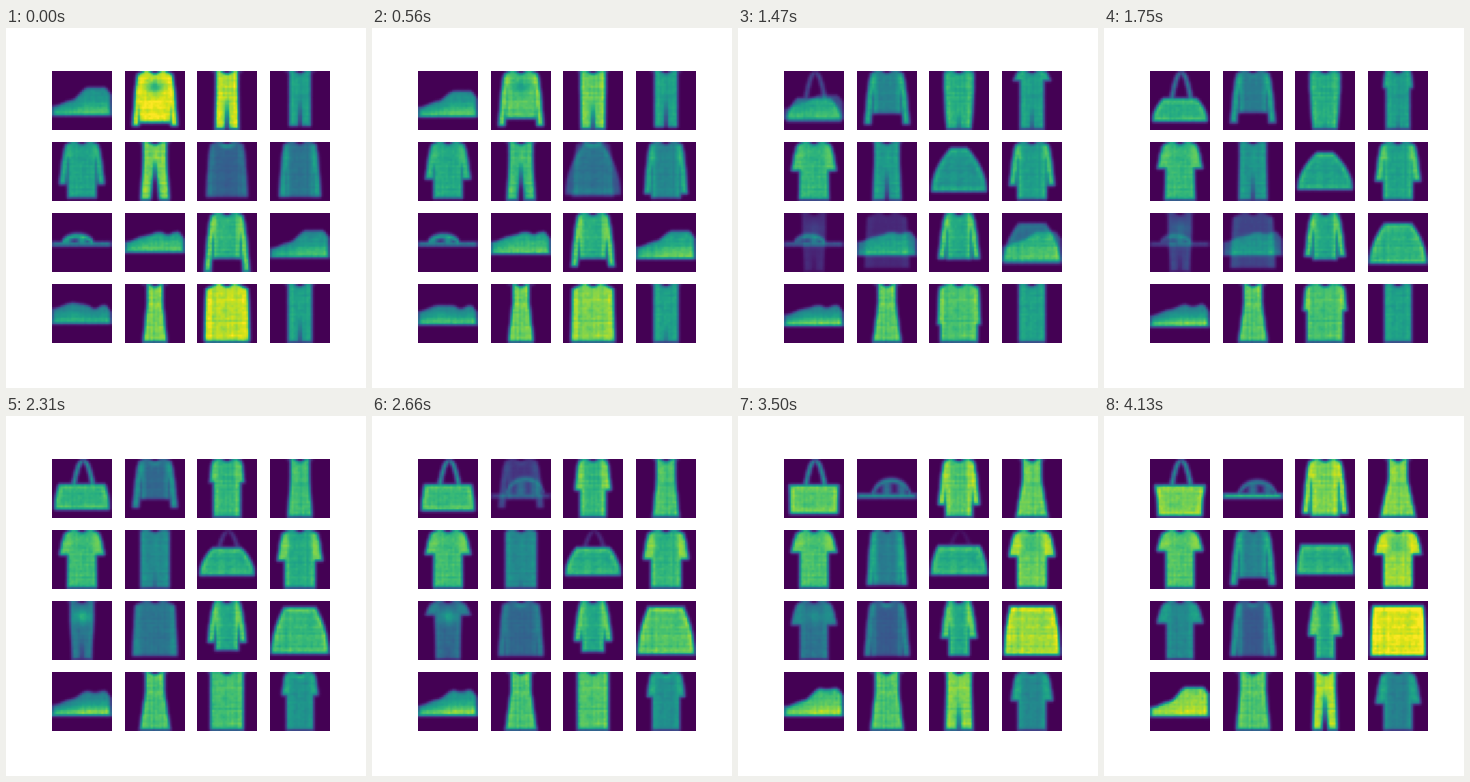
Write a matplotlib script that moves like this. It is 360 px wide and 360 px high and loops after 5.25 s.

```python
import numpy as np
import matplotlib.pyplot as plt
from matplotlib.animation import FuncAnimation

STAGE = 360
N = 28
MOVING, TOTAL, STEP = 60, 75, 70
LEFT = (46, 119, 191, 264)
TOP = (43, 114, 185, 256)
W, H = 60, 59

Y, X = np.mgrid[0:N, 0:N] + 0.5
SIDE = abs(X - 14)


def ramp(d):
    """Soft coverage from the distance inside an edge."""
    return np.clip(0.75 * d + 0.5, 0, 1)


def ease(u):
    u = np.clip(u, 0, 1)
    return u * u * (3 - 2 * u)


def glow(x, y, rx, ry):
    return np.exp(-((X - x) / rx) ** 2 - ((Y - y) / ry) ** 2)


def least(*fields):
    return np.minimum.reduce(np.broadcast_arrays(*fields))


# Painters: lengths are in picture cells, tones run from 0 to 1.
def draw_wear(tone, body, flare, hem, cuff, out, neck, crotch, gap, side, collar, chest):
    fall = Y - 0.45 * np.clip(SIDE - neck, 0, None)
    scoop = Y - 1.2 * (1 - (SIDE / 2.8) ** 2)
    half = body + flare * np.clip((Y - 9) / 18, 0, 1)
    trunk = least(half - SIDE, hem - Y)
    outer = body + (out - body) * np.sqrt(np.clip(Y / max(cuff, 0.1), 0, 1))
    width = np.interp(cuff, [12, 20], [5, 2.8])
    sleeve = least(outer - SIDE, SIDE - outer + width, cuff - Y)
    split = np.where(Y > crotch, SIDE + 1 - gap * (1 + (Y - crotch) / 8), N)
    d = least(np.maximum(trunk, sleeve), fall, scoop, split)
    light = tone - side / 3 + side * ease((SIDE - half + 3) / 3)
    light = light + collar * glow(14, 1.5, 2.6, 1.4) + chest * glow(14, 7.5, 4, 3.5)
    return ramp(d) * light


def draw_shoe(tone, sole, toe, shaft, base, dip):
    vamp = toe - 3 * ease(X / 10)
    upper = vamp - (toe - 3 - shaft) * ease((X - 9) / 8)
    upper = upper + dip * glow(20, Y, 2.5, 1) + 4 * ease((X - 24.5) / 4)
    d = least(Y - upper, base - Y, X - 0.5, 27.3 - X)
    depth = np.clip((Y - upper) / (base - upper), 0, 1)
    return ramp(d) * (tone + sole * depth ** 2)


def draw_bag(tone, top, base, wide, taper, handle):
    depth = np.clip((Y - top) / (base - top), 0, 1)
    half = wide - taper * (1 - depth) ** 2
    d = least(half - SIDE, Y - top, base - Y)
    body = ramp(d) * (tone + 0.12 * np.exp(-((d - 1) / 1.3) ** 2))
    bow = 4.4 * np.sqrt(np.clip((Y - 0.6) / (top - 0.6), 0, 1))
    strap = least(0.8 - abs(abs(X - 14.6) - bow), Y - 0.6, top - Y)
    return np.maximum(body, handle * ramp(strap))


def draw_sandal(tone, straps, sole, mid, half, lift):
    u = np.clip((X - mid) / half, -1, 1)
    crest = sole - lift * np.sqrt(1 - u * u)
    band = np.exp(-((Y - crest - 1) / 1.2) ** 2) * (abs(X - mid) < half)
    posts = ramp(least(Y - crest, sole - Y)) * (0.45 + 0.35 * np.cos(0.9 * X))
    slab = ramp(least(0.9 - abs(Y - sole), X - 0.5, 27.3 - X))
    return np.maximum(tone * slab, straps * np.maximum(band, posts))


# Looks: a painter and its settings.
PLAIN = dict(body=6.5, flare=0, hem=27.3, cuff=0, out=10.4, neck=4.5,
             crotch=9, gap=0, side=0.1, collar=0, chest=0)


def tee(tone, **kw):
    return draw_wear, {**PLAIN, "cuff": 11, "tone": tone, **kw}


def pullover(tone, **kw):
    return draw_wear, {**PLAIN, "cuff": 26, "hem": 26, "side": 0.2, "tone": tone, **kw}


def dress(tone, **kw):
    return draw_wear, {**PLAIN, "body": 4.3, "neck": 4, "tone": tone, **kw}


def trousers(tone, **kw):
    return draw_wear, {**PLAIN, "body": 5.4, "neck": 5, "gap": 0.6, "tone": tone, **kw}


def shoe(tone, **kw):
    return draw_shoe, {**dict(sole=0.3, toe=17, shaft=9, base=21, dip=0), "tone": tone, **kw}


def bag(tone, **kw):
    return draw_bag, {**dict(top=12, base=24, wide=12.8, taper=2, handle=0), "tone": tone, **kw}


def sandal(tone, **kw):
    return draw_sandal, {**dict(straps=0.48, sole=17.6, mid=16, half=9, lift=7.5),
                         "tone": tone, **kw}


def blend(a, b, t):
    """Morph one kind of look into itself; cross-fade different kinds."""
    (draw, p), (other, q) = a, b
    if draw is other:
        return draw(**{k: p[k] + (q[k] - p[k]) * t for k in p})
    return (1 - t) * draw(**p) + t * other(**q)


def soften(img):
    p = np.pad(img, 1, mode="edge")
    p = 0.14 * (p[:-2] + p[2:]) + 0.72 * p[1:-1]
    return 0.14 * (p[:, :-2] + p[:, 2:]) + 0.72 * p[:, 1:-1]


def weave(seed):
    rng = np.random.default_rng(seed)
    grain = soften(rng.normal(0, 0.04, (N, N)))
    return 1 + grain + rng.normal(0, 0.02, (N, 1)) + rng.normal(0, 0.02, (1, N))


cells = []


def cell(looks):
    """Add the next cell of the grid: looks keyed by frame."""
    cells.append((looks, weave(len(cells))))


# Row 1
cell({0: shoe(.5, shaft=8),
      16: shoe(.5, toe=18, shaft=11.5, base=22.5, sole=.4),
      25: bag(.62, top=13, taper=5, handle=.5),
      33: bag(.64, handle=.62),
      59: bag(.78, top=12.5, base=27, wide=10.3, taper=-1.5, handle=.6)})
cell({0: pullover(.97, hem=24.5, body=7.3, chest=-.35, side=0),
      16: pullover(.56, hem=20.5),
      33: pullover(.4, hem=19, cuff=23, collar=.25),
      42: sandal(.38, straps=.5, lift=9),
      59: sandal(.78)})
cell({0: trousers(.93, body=5, flare=.3),
      16: trousers(.68, body=6.8, flare=-1, crotch=13),
      25: trousers(.66, body=7, flare=-1.3, crotch=14, gap=.4),
      33: tee(.7, body=6.2, out=8),
      42: pullover(.73, body=5.8, hem=27.3, cuff=18, out=8.7),
      59: pullover(.84, hem=27, side=.1)})
cell({0: trousers(.58, body=4.9, hem=26),
      16: trousers(.6),
      25: trousers(.57, cuff=8, out=6.9, crotch=14, gap=.45),
      33: dress(.7, flare=1.3),
      59: dress(.82, flare=3.8)})

# Row 2
cell({0: tee(.6, cuff=20, hem=26.4),
      25: tee(.69, cuff=12.5, flare=.5),
      59: tee(.75, cuff=10, out=10.7)})
cell({0: trousers(.82, flare=1.2, gap=.9, crotch=8),
      16: trousers(.6, flare=.9, gap=.7),
      33: trousers(.5, body=6.7, gap=.4),
      42: trousers(.5, body=7.4, gap=.3),
      50: pullover(.48, out=9.2),
      59: pullover(.5, hem=22.5)})
cell({0: pullover(.34, body=7, out=9.6, side=.1, collar=.4),
      16: bag(.45, top=0, base=25, taper=9),
      25: bag(.57, top=5, base=22.5, taper=9),
      33: bag(.62, top=8.5, base=21.5, taper=6, handle=.2),
      59: bag(.62, top=7, base=21, wide=13.2)})
cell({0: pullover(.45, body=6.8, out=9.6),
      16: pullover(.6, cuff=23, hem=27),
      33: tee(.68, cuff=14.5, body=7, side=.2),
      59: tee(.88, cuff=11.5, body=6.8, out=11, chest=-.15)})

# Row 3
dome = dict(sole=14.8, mid=12, half=7.5, lift=4.8)
cell({0: sandal(.5, straps=.75, **dome),
      16: sandal(.45, straps=.6, **dome),
      33: trousers(.42, flare=-1, crotch=13, chest=.25),
      42: tee(.34, cuff=12, gap=.3, crotch=13, chest=.2),
      59: tee(.5, cuff=10.5, body=6.1, out=10.7)})
cell({0: shoe(.58, toe=14, base=18.5, dip=1.5),
      16: shoe(.58, toe=14, base=20, dip=1),
      33: pullover(.42, body=8.5, side=.1),
      42: pullover(.33, body=7, side=.12, collar=.4),
      59: pullover(.37, body=6.8, side=.28, collar=.25)})
cell({0: pullover(.7, hem=21.5, cuff=27.5),
      25: pullover(.65, hem=22, cuff=20.5, body=5.4, out=9.3),
      59: pullover(.65, hem=27.3, cuff=16.5, body=4.4, out=7.8)})
cell({0: shoe(.48, shaft=8.5),
      16: shoe(.62, toe=16, base=22.5),
      25: bag(.63, top=5, wide=13.3, taper=7),
      33: bag(.66, top=3, base=25, wide=13.3, taper=6),
      59: bag(.94, top=2.3, base=26, taper=1)})

# Row 4
cell({0: shoe(.45, toe=12, shaft=10, base=18.7, dip=2),
      16: shoe(.45, toe=14.5, shaft=10.5, base=19.5, sole=.5, dip=1.5),
      33: shoe(.42, toe=16, base=20.5, sole=.55, dip=1),
      59: shoe(.8, shaft=7.3, sole=.15)})
cell({0: dress(.83, body=3.6, flare=1.8),
      33: dress(.74, flare=2.7, collar=.15),
      59: dress(.76, body=6, flare=1.7, neck=6)})
cell({0: tee(.94, cuff=27, body=9.5),
      16: tee(.76, cuff=27, body=9, out=9.8),
      33: trousers(.74, body=7.6, neck=7, gap=.15),
      42: trousers(.79, body=6.7, gap=.35),
      59: trousers(.9, body=4.9, flare=.8, gap=.7, crotch=8)})
cell({0: trousers(.6, gap=.5),
      25: trousers(.6, body=6.1, gap=.2, crotch=12),
      33: tee(.54, body=6.1, out=8.4, collar=.3),
      59: tee(.48, cuff=15, side=.15, collar=.1)})


def picture(i, looks, cloth):
    n = min(i, MOVING - 1)
    start = max(k for k in looks if k <= n)
    end = min((k for k in looks if k > n), default=start)
    t = (n - start) / max(end - start, 1)
    return np.clip(soften(blend(looks[start], looks[end], t)) * cloth, 0, 1)


fig = plt.figure(figsize=(3.6, 3.6), dpi=100, facecolor="white")
images = []
for j, (looks, cloth) in enumerate(cells):
    x, y = LEFT[j % 4], TOP[j // 4]
    ax = fig.add_axes([x / STAGE, 1 - (y + H) / STAGE, W / STAGE, H / STAGE])
    ax.axis("off")
    images.append(ax.imshow(picture(0, looks, cloth), cmap="viridis",
                            vmin=0, vmax=1, aspect="auto"))


def update(i):
    for im, (looks, cloth) in zip(images, cells):
        im.set_data(picture(i, looks, cloth))
    return images


anim = FuncAnimation(fig, update, frames=TOTAL, interval=STEP,
                     repeat=True, repeat_delay=0, blit=False)
plt.show()
```
